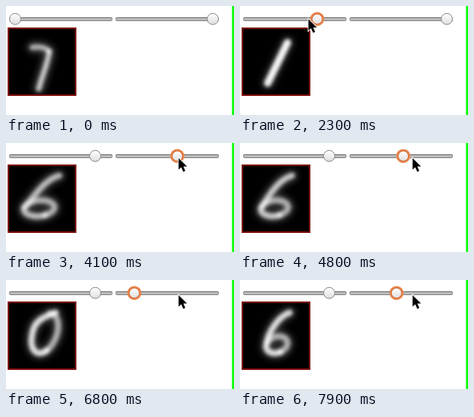
Animation of 285 by 137 pixels, one loop 8000 ms. Source, as an HTML page:

```html
<!DOCTYPE html>
<html lang="en">
<head>
<meta charset="utf-8">
<title>Digit sliders</title>
<style>
  html, body { margin: 0; width: 100%; height: 100%; overflow: hidden; background: #fff; }
  svg { display: block; width: 100%; height: 100%; }
</style>
</head>
<body>
<svg viewBox="0 0 285 137">
  <defs>
    <linearGradient id="face" x2="0" y2="1">
      <stop offset="0" stop-color="#fff"/>
      <stop offset="1" stop-color="#dedede"/>
    </linearGradient>
    <linearGradient id="groove" x2="0" y2="1">
      <stop offset="0" stop-color="#a6a6a6"/>
      <stop offset="1" stop-color="#cacaca"/>
    </linearGradient>
    <filter id="soft" filterUnits="userSpaceOnUse" x="0" y="20" width="95" height="100"><feGaussianBlur stdDeviation="2"/></filter>
    <filter id="haze" filterUnits="userSpaceOnUse" x="0" y="20" width="95" height="100"><feGaussianBlur stdDeviation="4"/></filter>
    <filter id="bloom" x="-50%" y="-50%" width="200%" height="200%"><feGaussianBlur stdDeviation=".7"/></filter>
    <clipPath id="frame"><rect x="4" y="29" width="82" height="82"/></clipPath>
    <rect id="track" x=".5" y="14.5" width="128" height="4" rx=".8" fill="url(#groove)" stroke="#808080"/>
    <circle id="knob" r="7" fill="url(#face)" stroke="#888"/>
    <g id="focus">
      <circle r="7.4" fill="none" stroke="#ec8a50" stroke-width="3" filter="url(#bloom)"/>
      <circle r="6.6" fill="url(#face)" stroke="#d87440" stroke-width="1.4"/>
    </g>
  </defs>
  <rect width="285" height="137" fill="#fff"/>
  <rect x="282.5" width="2.5" height="137" fill="#0f0"/>
  <use href="#track" x="4"/>
  <use href="#track" x="137"/>
  <rect x="3" y="28" width="84" height="84" fill="#000" stroke="#7c0a0a" stroke-width="2"/>
  <g clip-path="url(#frame)" fill="none" stroke="#fff" stroke-linecap="round" stroke-linejoin="round">
    <path id="halo" filter="url(#haze)" stroke-width="14" opacity=".25"/>
    <g filter="url(#soft)">
      <path id="tail"/>
      <path id="stem"/>
    </g>
  </g>
  <use id="left"/>
  <use id="right"/>
  <path id="cursor" d="M0 0V14.5L3.3 11.5 5.9 17.2 8.4 16.1 6 10.6H10.6Z" stroke="#fff" stroke-width="1.8" paint-order="stroke"/>
</svg>
<script>
const LOOP = 8000, TICK = 100;
const $ = id => document.getElementById(id);
const lerp = (a, b, k) => a + (b - a) * k;
const clamp = (v, lo = 0, hi = 1) => Math.max(lo, Math.min(hi, v));
const smooth = k => k * k * (3 - 2 * k);

// A click on the track moves the knob, held keys then nudge it once per tick
const left = { from: 11.5, click: 1000, to: 87.5, focus: 1500, blur: 3500,
  keys: [[1500, 1500, 3], [1800, 1800, 3], [2300, 2800, 3]] };
const right = { from: 258.5, click: 3500, to: 217.5, focus: 4100, blur: LOOP,
  keys: [[4100, 4100, -3.35], [4600, 6200, -3.35], [6800, 7900, 3.2]] };

// Pointer glides: start, end, target
const glides = [[500, 1000, 90, 14], [1900, 2000, 85.5, 16.5], [2900, 3200, 223.5, 21.5], [3300, 3500, 215.7, 19]];

function knobAt({ from, click, to, keys }, t) {
  if (t < click) return from;
  return keys.reduce((x, [start, end, step]) =>
    t < start ? x : x + step * ((Math.min(t, end) - start) / TICK + 1), to);
}

function pointerAt(t) {
  let x = 154, y = 40;
  for (const [start, end, toX, toY] of glides) {
    const k = clamp((t - start) / (end - start));
    x = lerp(x, toX, k);
    y = lerp(y, toY, k);
  }
  return [x, y];
}

const seven = () => ({
  stem: "M54 57C53 70 46 85 41 104", tail: "M33 52Q47 50 54 57", width: 6.5, bright: .72, dim: .6
});

function slash(l) {
  const dx = 12.5 + (l - 97) * .27;
  return { stem: `M${47 + dx} 46L${47 - dx} 97`, tail: "", width: 8.7, bright: .95, dim: 0 };
}

// A stem running into a leaning ring: the ring grows from a six into a zero
function ringed(r) {
  const open = smooth(clamp((200 - r) / 35));
  const wide = clamp((r - 195.5) / 9, 0, 1.5);
  const rx = lerp(13, 15.5, open) + 4 * wide, ry = lerp(10, 25, open);
  const cx = lerp(46, 48.5, open) - 3 * wide, cy = 92 - ry;
  const point = deg => {
    const a = deg * Math.PI / 180, dy = ry * Math.sin(a);
    return [cx + rx * Math.cos(a) - .25 * dy, cy + dy];
  };
  const arc = (from, to) => {
    let d = "";
    for (let i = 0; i <= 16; i++) d += "L" + point(lerp(from, to, i / 16));
    return d;
  };
  const [x, y] = point(180);
  return {
    stem: `M${62 + 3 * wide} 41C48 46 ${x + 2 + 8 * wide} ${y - 16} ${x} ${y}` + arc(180, 60),
    tail: arc(60, lerp(-170, -90, open)).replace("L", "M"),
    width: 7.5, bright: .82 - .12 * wide, dim: .58
  };
}

function drawDigit({ stem, tail, width, bright, dim }) {
  const put = (id, d, alpha) => {
    $(id).setAttribute("d", d);
    $(id).setAttribute("stroke-opacity", alpha);
  };
  put("halo", stem + tail, 1);
  put("stem", stem, bright);
  put("tail", tail, dim);
  $("stem").setAttribute("stroke-width", width);
  $("tail").setAttribute("stroke-width", width);
}

function drawKnob(id, slider, t) {
  const x = knobAt(slider, t);
  $(id).setAttribute("href", t >= slider.focus && t < slider.blur ? "#focus" : "#knob");
  $(id).setAttribute("transform", `translate(${x} 16.3)`);
  return x;
}

function draw(ms) {
  const t = Math.floor(ms / TICK) * TICK;
  const l = drawKnob("left", left, t), r = drawKnob("right", right, t);
  drawDigit(t < left.click ? seven() : t < right.click ? slash(l) : ringed(r));
  $("cursor").setAttribute("transform", `translate(${pointerAt(t)})`);
  $("cursor").setAttribute("visibility", t < 500 ? "hidden" : "visible");
}

const began = performance.now();
function loop() {
  draw((performance.now() - began) % LOOP);
  requestAnimationFrame(loop);
}
loop();
</script>
</body>
</html>
```
